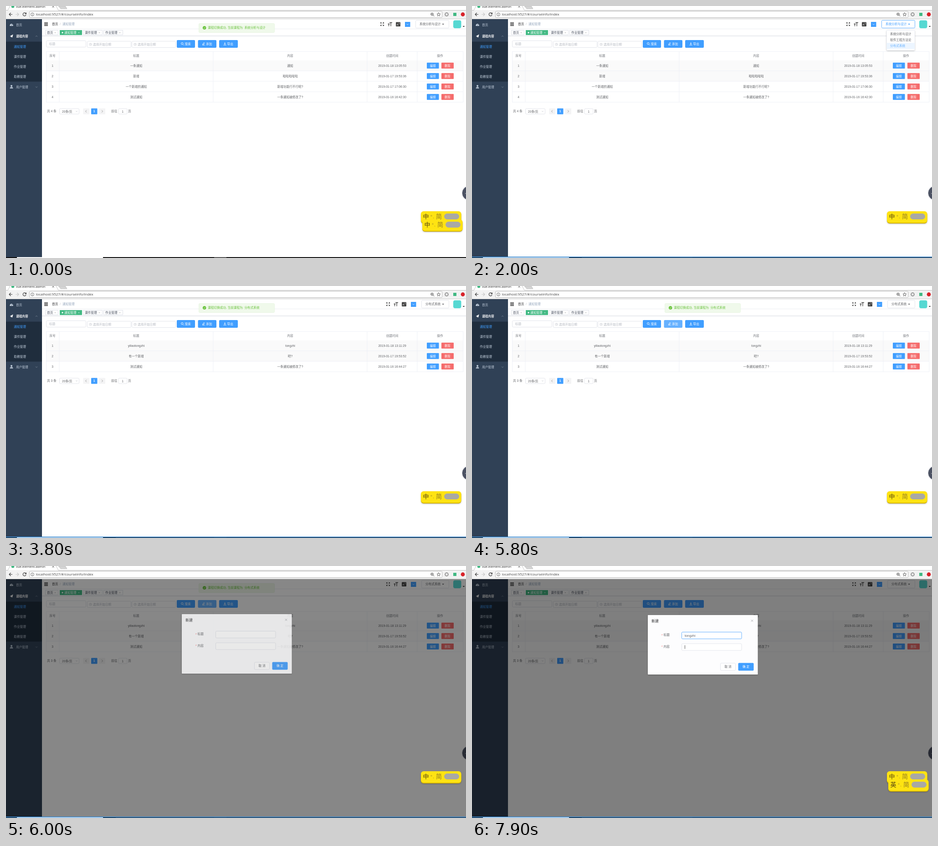
An HTML page for the animation above (8 s loop, 1010 by 555 pixels).

```html
<!DOCTYPE html>
<html>
<head>
<meta charset="utf-8">
<style>
html, body { margin: 0; width: 100%; height: 100%; overflow: hidden; background: #fff; }
svg { display: block; width: 1010px; height: 555px; }
text { font-family: 'Liberation Sans', 'Noto Sans CJK SC', 'Noto Sans CJK', sans-serif; white-space: pre; }
.ui { font-family: 'Open Sans', 'Noto Sans', sans-serif; }
</style>
</head>
<body>
<svg id="stage" viewBox="0 0 1010 555"></svg>
<script>
const LOOP = 8000, STEP = 100;
const BLUE = '#409eff', HOVER = '#66b1ff', RED = '#f56c6c', GREEN = '#42b983';
const INK = '#606266', PALE = '#b4b8c0', LINE = '#ebeef5', EDGE = '#dcdfe6';

// Drawing helpers return SVG markup; text is centred on y.
const rect = (x, y, w, h, fill, extra = '') =>
  `<rect x="${x}" y="${y}" width="${w}" height="${h}" fill="${fill}" ${extra}/>`;
const box = (x, y, w, h, fill = '#fff', stroke = EDGE, r = 2) =>
  rect(x + .5, y + .5, w - 1, h - 1, fill, `stroke="${stroke}" stroke-width=".8" rx="${r}"`);
const text = (x, y, s, fill = INK, size = 6.65, extra = '') =>
  `<text x="${x}" y="${y + size * .36}" fill="${fill}" font-size="${size}" ${extra}>${s}</text>`;
const mid = (x, y, s, fill, size, extra = '') => text(x, y, s, fill, size, 'text-anchor="middle" ' + extra);
const path = (d, stroke, w = 1, fill = 'none') =>
  `<path d="${d}" stroke="${stroke}" stroke-width="${w}" fill="${fill}"/>`;
const dot = (x, y, r, fill, extra = '') => `<circle cx="${x}" cy="${y}" r="${r}" fill="${fill}" ${extra}/>`;
const group = (s, extra) => `<g ${extra}>${s}</g>`;
const shift = (x, y) => `transform="translate(${x} ${y})"`;
const chevron = (x, y, dir, stroke, s = 2) => path(`M${x - s} ${y - dir * s / 2}l${s} ${dir * s}l${s} ${-dir * s}`, stroke, .8);
const side = (x, y, dir, stroke) => path(`M${x - dir} ${y - 2.5}l${2.5 * dir} 2.5l${-2.5 * dir} 2.5`, stroke, .8);
const caret = (x, y, fill) => path(`M${x - 2.3} ${y - 1}h4.6l-2.3 2.6z`, 'none', 0, fill);
const cross = (x, y, s, stroke, w = .7) => path(`M${x - s} ${y - s}l${2 * s} ${2 * s}m0 ${-2 * s}l${-2 * s} ${2 * s}`, stroke, w);
const ring = (x, y, r, stroke, w = .8) => dot(x, y, r, 'none', `stroke="${stroke}" stroke-width="${w}"`);

function browser() {
  return rect(0, 0, 1010, 29, '#fff') + rect(0, 9, 1010, 19.5, '#f2f2f2') +
    path('M0 9.5H4L9 0M110 0L115 9.5H1010', '#b5b5b5', .8) +
    path('M115 0h15l4 6h-14z', '#b0b0b0', .7, '#d4d4d4') +
    rect(10, 9, 104, 1, '#f2f2f2') + dot(15, 1, 3.3, GREEN) +
    text(22, 1, 'vue-element-admin', '#333', 7.05, 'class="ui"') + cross(103.5, 1.5, 2, '#444', .9) +
    path('M14 18.5H7M10.5 15L7 18.5L10.5 22', '#444', 1.2) +
    path('M21 18.5H28M24.5 15L28 18.5L24.5 22', '#c8c8c8', 1.2) +
    path('M43.7 16.5A3.5 3.5 0 1 0 44 19.5M44.3 14.5V17.3H41.5', '#444', 1.2) +
    box(51, 11, 907, 15, '#fff', '#aaa') + ring(58, 18.5, 3.5, '#555') +
    rect(57.6, 18, .9, 2.5, '#555') + rect(57.6, 16.3, .9, .9, '#555') +
    text(65.5, 18.5, 'localhost:9527/#/courseinfo/index', '#444', 7.9, 'class="ui"') +
    ring(935.5, 18, 2.7, '#444', 1) + path('M937.5 20l2.7 2.7M934 18h3', '#444', 1) +
    path('M950 14.5l1.1 2.7 2.9.2-2.2 1.9.7 2.9-2.5-1.6-2.5 1.6.7-2.9-2.2-1.9 2.9-.2z', '#444', .8) +
    ring(967.5, 18.5, 3.4, '#999', 2) + rect(982, 15, 7, 7, GREEN) + dot(1003, 18.5, 4.4, '#d8232a') +
    rect(0, 28, 1010, 1, '#ccc');
}

function sidebar() {
  const pale = '#bfcbd9';
  const subs = ['通知管理', '课件管理', '作业管理', '助教管理'];
  return rect(0, 29, 79, 524, '#304156') + rect(0, 78.5, 79, 88, '#1f2d3d') +
    path('M8.5 44a3.7 3.7 0 1 1 7 0z', 'none', 0, pale) + path('M12 43l1.5-3', '#304156', .8) +
    text(22, 41.5, '首页', pale) +
    path('M8.5 66.5L15.5 62.5L14 69.5L11.8 68L10.8 69.8V67.3z', 'none', 0, '#f4f4f5') +
    text(22, 66.5, '课程内容', '#f4f4f5', 6.65, 'font-weight="bold"') + chevron(67, 66.5, -1, '#8793a3') +
    subs.map((s, i) => text(17.3, 89.7 + 22 * i, s, i ? pale : BLUE)).join('') +
    dot(12, 176, 2, pale) + path('M8.5 181.5q0-3 3.5-3t3.5 3z', 'none', 0, pale) +
    text(22, 178.5, '用户管理', pale) + chevron(67, 178.5, 1, '#8793a3');
}

function tag(x, w, label, active) {
  const ink = active ? '#fff' : '#495060';
  return box(x, 53, w, 11, active ? GREEN : '#fff', active ? GREEN : '#d8dce5', 0) +
    (active ? dot(x + 6, 58.7, 1.6, '#fff') : '') +
    text(x + (active ? 10 : 4), 58.5, label, ink) + cross(x + w - 7, 58.7, 1.1, active ? '#fff' : '#999', .6);
}

function topIcons() {
  const corners = [[1, 1], [1, -1], [-1, 1], [-1, -1]].map(([a, b]) =>
    path(`M${826 + a} ${40 + b}l${2.5 * a} ${2.5 * b}m${-2.2 * a} 0h${2.2 * a}v${-2.2 * b}`, '#444', 1)).join('');
  return corners +
    path('M838.5 39.5h4M840.5 39.5v5M842 36.5h6M845 36.5v8', '#444', 1.3) +
    rect(856, 35.5, 10, 9.5, '#444', 'rx="1"') + mid(859.5, 41, 'A', '#fff', 6) + mid(863.5, 38.5, '文', '#fff', 3) +
    rect(876, 35, 11.5, 11, BLUE) + chevron(881.7, 40.5, 1, '#fff');
}

function header(course, hot) {
  const x = course.length > 5 ? 899 : 912;
  return rect(84, 36.5, 8, 1.4, '#111') + rect(84, 39.4, 8, 1.4, '#111') + rect(84, 42.3, 8, 1.4, '#111') +
    text(101, 40, '首页', '#303133') + text(118, 40, '/', PALE) + text(124, 40, '通知管理', '#97a8be') +
    rect(79, 50, 931, .7, '#e4e7ec') + rect(79, 65.5, 931, .9, '#d0d4dc') +
    tag(86, 29, '首页') + tag(118, 49, '通知管理', true) + tag(169, 43, '课件管理') + tag(214, 43, '作业管理') +
    group(topIcons(), shift(x - 899, 0)) +
    box(x, 31, 973 - x, 18, '#fff', hot ? BLUE : EDGE) +
    text(x + 9, 40, course, hot ? BLUE : INK) + caret(959.7, 40, hot ? BLUE : INK) +
    rect(982, 31.5, 17.5, 17.5, '#56d8d2', 'rx="4"') + caret(1005, 45, '#333');
}

function button(x, w, label, icon, hot) {
  return rect(x, 75, w, 17, hot ? HOVER : BLUE, 'rx="2"') + path(icon, '#fff', .9) +
    text(x + 17.5, 83.5, label, '#fff', 6.65, 'font-weight="500"');
}

function filters(hot) {
  const date = x => box(x, 77, 97, 15) + ring(x + 7.5, 84.5, 2.6, PALE, .6) +
    path(`M${x + 7.5} 83v1.7h1.4`, PALE, .6) + text(x + 13, 84.8, '选择开始日期', PALE);
  return box(88, 76, 88, 15) + text(94.8, 83.7, '标题', PALE) + date(178) + date(276) +
    button(375, 40, '搜索', 'M389 82.7a2.2 2.2 0 1 0-4.4 0a2.2 2.2 0 1 0 4.4 0M388.5 84.5l2 2', hot == 'search') +
    button(421.5, 40.5, '添加', 'M431 86h5.5M431.5 84.5l3-4 1.5 1.2-3 3.7z', hot == 'add') +
    button(468, 41, '导出', 'M480.5 80v4M478.7 82.5l1.8 1.8 1.8-1.8M477.5 86h6', false);
}

const lists = {
  系统分析与设计: [
    ['一条通知', '通知', '18 13:05:53'], ['新增', '啦啦啦啦啦', '17 19:53:36'],
    ['一个新增的通知', '新增功能行不行呢?', '17 17:06:30'], ['测试通知', '一条通知被修改了?', '16 16:42:30']],
  分布式系统: [
    ['yiliaotongzhi', 'tongzhi', '18 13:11:29'], ['有一个新增', '吧?', '17 19:53:52'],
    ['测试通知', '一条通知被修改了?', '16 16:44:27']]
};
const centres = [102, 286, 624, 848, 953];

function table(rows, shaded) {
  const bottom = 120 + 23 * rows.length;
  const small = (x, y, w, label, fill) => rect(x, y - 6.5, w, 13, fill, 'rx="1"') +
    mid(x + w / 2, y, label, '#fff', 6.4, 'font-weight="500"');
  let s = rect(88, 120, 916, 23 * shaded, '#fafafa');
  s += ['序号', '标题', '内容', '创建时间', '操作'].map((h, i) => mid(centres[i], 110, h, '#73767c')).join('');
  rows.forEach(([title, body, date], i) => {
    const y = 131.3 + 23 * i;
    s += [i + 1, title, body, '2019-01-' + date].map((c, k) => mid(centres[k], y, c)).join('') +
      small(924, y, 26.5, '编辑', BLUE) + small(956, y, 27, '删除', RED) + rect(88, 142.5 + 23 * i, 916, .8, LINE);
  });
  s += rect(88, 99.8, 916, .8, LINE);
  return s + [88, 116.5, 454.5, 792.5, 902.5, 1003.5].map(x => rect(x, 100, .8, bottom - 100, LINE)).join('') +
    group(pager(rows.length), shift(0, bottom + 20));
}

function pager(n) {
  return text(90, 0, `共 ${n} 条`) + box(117, -6.5, 44, 13) + text(123, .3, '20条/页') + chevron(155, 0, 1, PALE, 1.6) +
    rect(169.5, -6.5, 13.5, 13, '#f4f4f5', 'rx="1"') + side(176, 0, -1, '#888') +
    rect(187, -6.5, 13.5, 13, BLUE, 'rx="1"') + mid(193.7, 0, '1', '#fff', 6.65, 'font-weight="bold"') +
    rect(204.5, -6.5, 13.5, 13, '#f4f4f5', 'rx="1"') + side(211, 0, 1, '#888') +
    text(231, 0, '前往') + box(246.5, -6.5, 20, 13) + mid(256, .2, '1') + text(268, 0, '页');
}

function message(course, alpha, dy) {
  return group(box(423, 38, 167, 21, '#f0f9eb', '#e5f4dd') + dot(435.7, 48, 3.8, '#67c23a') +
    path('M434 48l1.3 1.4 2.4-2.6', '#fff', .8) +
    text(443, 48, '课程切换成功, 当前课程为: ' + course, '#67c23a'), `opacity="${alpha}" ` + shift(0, dy));
}

function menu(hot, open) {
  const items = ['系统分析与设计', '软件工程方法论', '分布式系统'];
  return group(box(910, 53, 62.5, 45, '#fff', LINE) + items.map((s, i) =>
    (i == hot ? rect(910.5, 81.3 + 13.3 * (i - 2), 61.5, 13.3, '#ecf5ff') : '') +
    text(918, 61.5 + 13.2 * i, s, i == hot ? HOVER : INK)).join(''),
    `opacity="${open}" filter="url(#soft)" transform="translate(0 ${53 * (1 - open)}) scale(1 ${open})"`);
}

function dialog(t, alpha, dy) {
  const typed = 'tongzhi'.slice(0, t < 7300 ? 0 : 1 + Math.floor((t - 7300) / 80));
  const inTitle = t >= 6600, inBody = t >= 7900;
  const field = (y, label, hot, value) => text(416, y + .5, '*', RED) + text(420.5, y, label) +
    box(460, y - 7, 132.5, 16, '#fff', hot ? BLUE : EDGE) + text(467, y + 1.2, value, INK, 7.3);
  return group(rect(386, 108, 241.5, 131, '#fdfdfe', 'rx="1" filter="url(#soft)"') +
    text(394, 121.5, '新建', '#303133', 8) + cross(615, 120.5, 2.2, '#909399') +
    field(152, '标题', inTitle, typed) + field(177.5, '内容', false, '') +
    (inBody ? rect(467, 174.5, .8, 8, '#333') : inTitle && !typed ? rect(467, 149, .8, 8, '#333') : '') +
    box(545, 213.5, 34, 17) + mid(562, 222, '取 消', INK, 6.65) +
    rect(584.5, 213.5, 34, 17, BLUE, 'rx="2"') + mid(601.5, 222, '确 定', '#fff', 6.65, 'font-weight="500"'),
    `opacity="${alpha}" ` + shift(0, dy));
}

function inputBar(mode) {
  return rect(911, 453, 88.5, 26, '#c9a800', 'rx="6" filter="url(#soft)"') + rect(911, 452, 88.5, 25.5, '#ffe312', 'rx="6"') +
    mid(922, 463.7, mode, '#4a3a10', 13) + ring(934, 462, 1.2, '#9a8630', .6) + text(937.5, 464, ',', '#8a762a', 8) +
    mid(950.5, 463.7, '简', '#8f7a22', 13) + rect(962, 457, 33, 13, '#a9a9a4', 'rx="6.5"');
}

function taskbar(lit) {
  return rect(0, 553, 1010, 2, '#111') + rect(24, 553, 189, 2, '#fff') + rect(457, 553, 27, 2, '#555') +
    (lit ? rect(0, 552, 1010, 1.8, '#3b8ad0') + rect(241, 553.8, 769, 1.2, '#36424f') : '');
}

function scene(t) {
  const ramp = (a, b) => Math.min(1, Math.max(0, (t - a) / (b - a)));
  const buttonCourse = t < 3100 ? '系统分析与设计' : '分布式系统';
  const listCourse = t < 3300 ? '系统分析与设计' : '分布式系统';
  const hot = t >= 4800 && t < 5200 ? 'search' : t >= 5200 && t < 6100 ? 'add' : '';
  const open = Math.min(ramp(900, 1200), 1 - ramp(2600, 2900));
  const item = t < 1300 ? -1 : t < 1600 ? 0 : t < 1900 ? 1 : 2;
  const enter = ramp(3400, 3800), leave = ramp(6400, 6700), gone = ramp(600, 900);
  const mask = t < 5900 ? 0 : t < 6000 ? .115 : t < 6100 ? .47 : .5;
  const [alpha, dy] = t < 6000 ? [.2, -7] : t < 6100 ? [.82, -2] : [1, 0];

  let s = '<defs><filter id="soft" x="-20%" y="-20%" width="140%" height="150%">' +
    '<feDropShadow dx="0" dy="1" stdDeviation="1.5" flood-opacity=".25"/></filter></defs>';
  s += rect(0, 0, 1010, 555, '#fff') + header(buttonCourse, t >= 700 && t < 2800) + filters(hot) +
    table(lists[listCourse], t < 1000 ? 1 : 2) + sidebar();
  if (gone < 1) s += message('系统分析与设计', 1 - gone, -21 * gone);
  if (enter > 0 && leave < 1) s += message('分布式系统', enter * (1 - leave), -21 * (1 - enter) - 4 * leave);
  if (open > 0) s += menu(item, open);
  s += dot(1017, 412, 15.5, '#4b5162', 'stroke="#c4c7ce" stroke-width=".8"') + rect(1008, 412.5, 2, .8, '#ddd');
  if (mask) s += rect(0, 29, 1010, 524, '#000', `opacity="${mask}"`) + dialog(t, alpha, dy);
  s += browser() + inputBar('中');
  if (t < 1000) s += group(inputBar('中'), shift(3, 18));
  if (t >= 7000) s += group(inputBar('英'), shift(3, 18));
  return s + taskbar(t >= 1000);
}

const stage = document.getElementById('stage');
const start = performance.now();
let shown = -1;
function tick() {
  const t = Math.floor((performance.now() - start) % LOOP / STEP) * STEP;
  if (t !== shown) stage.innerHTML = scene(shown = t);
  requestAnimationFrame(tick);
}
tick();
</script>
</body>
</html>
```
